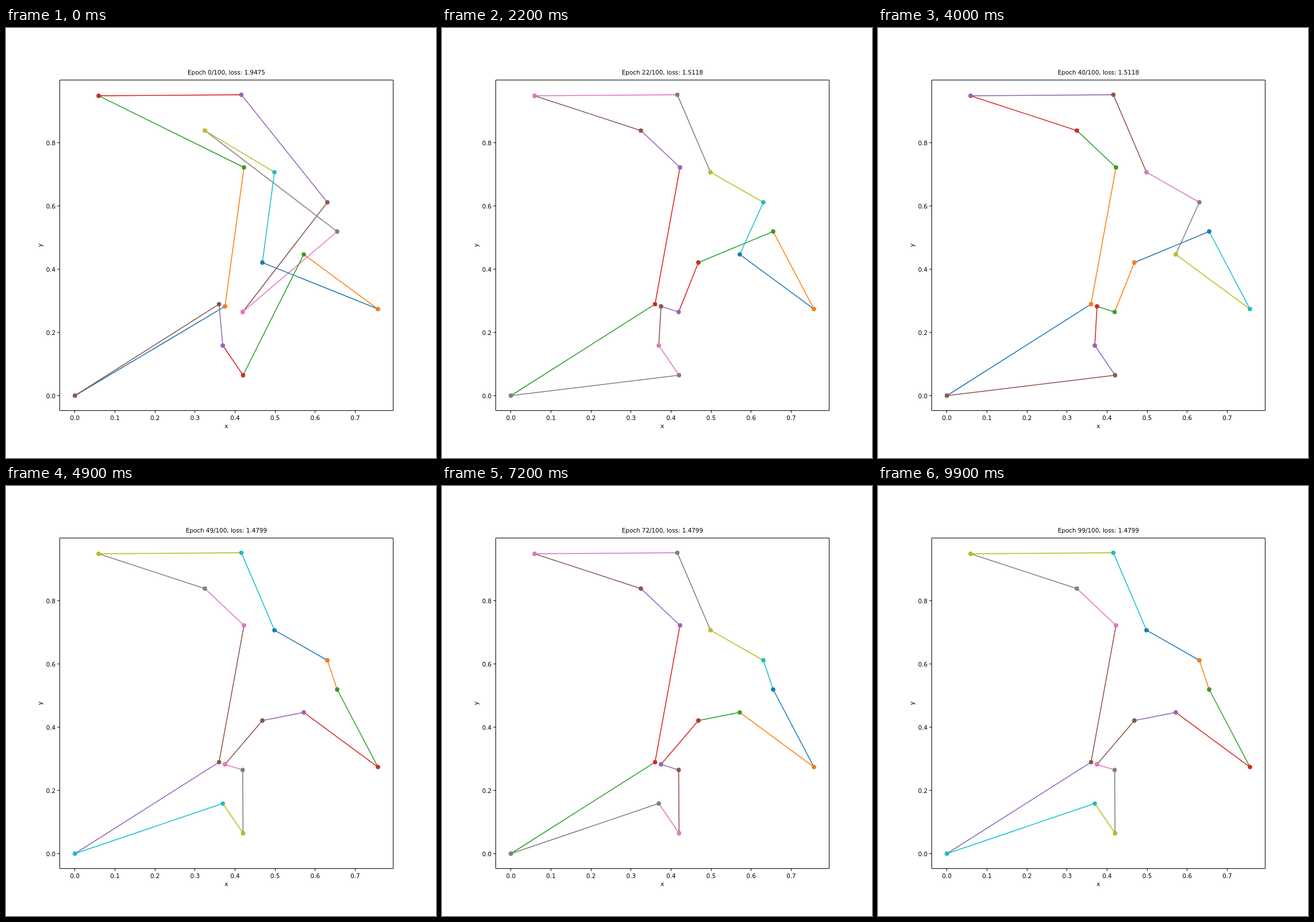
Recreate the animation shown at these times as an HTML page. Size 748 by 748 pixels, loop 10 s.

```html
<!DOCTYPE html>
<html lang="en">
<head>
<meta charset="utf-8">
<title>Tour optimisation</title>
<style>
  html, body { margin: 0; width: 100%; height: 100%; overflow: hidden; background: #fff; }
  svg { display: block; width: 748px; height: 748px; }
  text { font: 10.39px "DejaVu Sans", sans-serif; text-anchor: middle; }
  .y text { text-anchor: end; }
  .axis path { fill: none; stroke: #000; stroke-width: 1; }
  #tour { stroke-width: 1.56; }
</style>
</head>
<body>
<svg viewBox="0 0 748 748">
  <g id="tour"></g>
  <g class="axis" id="axes"><path d="M93.5 90.5H673.5V665.5H93.5Z"/></g>
  <text id="title" x="383.4" y="81.4"></text>
  <text x="383.4" y="695.5">x</text>
  <text transform="translate(62.6 378) rotate(-90)">y</text>
</svg>
<script>
const STEP = 100, EPOCHS = 100;
const COLORS = ['#1f77b4', '#ff7f0e', '#2ca02c', '#d62728', '#9467bd',
                '#8c564b', '#e377c2', '#7f7f7f', '#bcbd22', '#17becf'];

// Cities in stage pixels; S is the start.
const CITIES = {
  S: [119.9, 639.5], A: [370.6, 480.4], B: [414, 242.5], C: [346, 178.4],
  D: [161.1, 117.9], E: [409.4, 116.1], F: [467, 250.8], G: [559, 303.2],
  H: [576.1, 354], I: [647, 488.8], J: [518, 393.8], K: [446, 408],
  L: [381, 484.2], M: [411.7, 493.9], N: [412.4, 604], O: [377.1, 552.3]
};

// Best tour found from each epoch onward.
const BEST = [
  { from: 0, loss: 1.9475, path: 'SLBDEGMHCFKIJNOAS' },
  { from: 6, loss: 1.6309, path: 'SOALMIHGEDBFCJKNS' },
  { from: 21, loss: 1.5118, path: 'SABCDEFGJIHKMLONS' },
  { from: 41, loss: 1.4799, path: 'SABCDEFGHIJKLMNOS' }
];

const $ = id => document.getElementById(id);
const dot = ([x, y], color) => `<circle cx="${x}" cy="${y}" r="3.64" fill="${color}"/>`;

function buildAxes() {
  let out = '';
  for (let i = 0; i < 8; i++) {
    const x = 119.85 + i * 69.65;
    out += `<path d="M${Math.floor(x) + 0.5} 666v3.6"/><text x="${x}" y="682">0.${i}</text>`;
  }
  out += '<g class="y">';
  for (let i = 0; i < 5; i++) {
    const y = 639.5 - i * 109.9;
    out += `<path d="M93 ${Math.floor(y) + 0.5}h-3.6"/><text x="86.2" y="${y + 4}">0.${i * 2}</text>`;
  }
  $('axes').innerHTML += out + '</g>';
}

function draw(epoch) {
  const { loss, path } = BEST.findLast(b => b.from <= epoch);
  const legs = path.length - 1;
  let out = '';
  for (let i = 0; i < legs; i++) {
    // The colour cycle carries on from one epoch to the next.
    const color = COLORS[(epoch * legs + i) % COLORS.length];
    const a = CITIES[path[i]], b = CITIES[path[i + 1]];
    out += `<path d="M${a}L${b}" stroke="${color}"/>` + dot(a, color) + dot(b, color);
  }
  $('tour').innerHTML = out;
  $('title').textContent = `Epoch ${epoch}/${EPOCHS}, loss: ${loss}`;
}

let shown = -1;
const start = performance.now();
function tick() {
  const epoch = Math.floor((performance.now() - start) / STEP) % EPOCHS;
  if (epoch !== shown) draw(shown = epoch);
  requestAnimationFrame(tick);
}

buildAxes();
tick();
</script>
</body>
</html>
```
